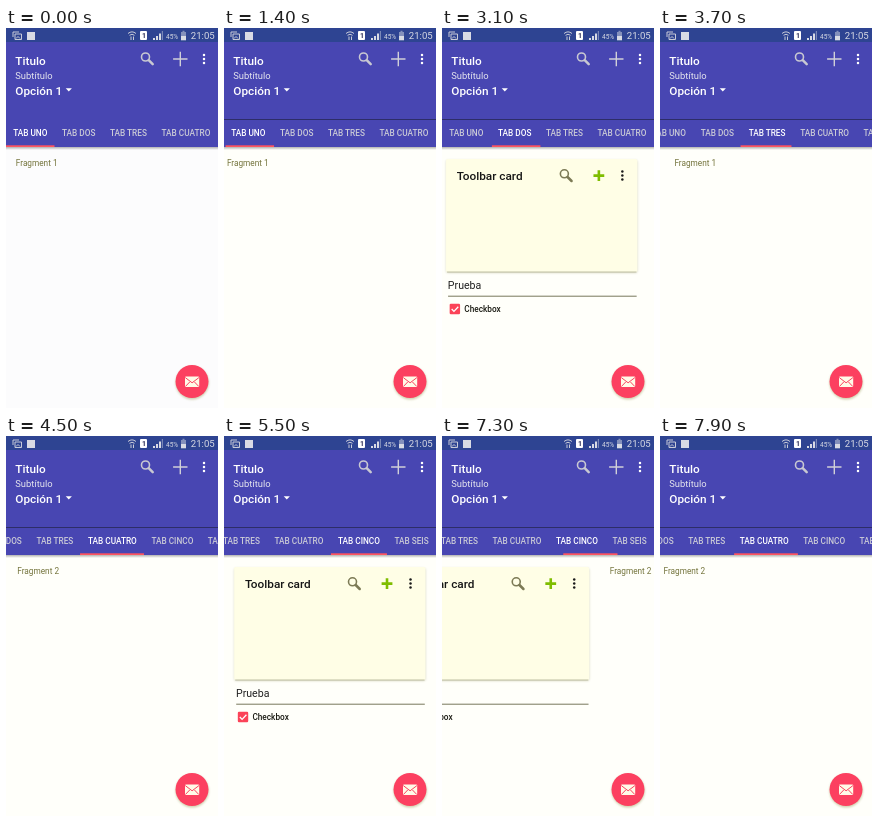
Animation of 212 by 380 pixels, one loop 8000 ms. Source, as an HTML page:

```html
<!DOCTYPE html>
<html lang="es">
<head>
<meta charset="utf-8">
<title>Tabs</title>
<style>
html, body { margin: 0; width: 100%; height: 100%; overflow: hidden; background: #fdfdfb; }
svg { display: block; width: 212px; height: 380px; }
text { font: 8.25px Roboto, sans-serif; white-space: pre; }
.head { font-size: 11.8px; font-weight: 500; }
.tab { font-weight: 500; }
.frag { fill: #74743c; }
</style>
</head>
<body>
<svg viewBox="0 0 212 380" xmlns="http://www.w3.org/2000/svg">
  <defs>
    <filter id="soft" x="-30%" y="-30%" width="160%" height="160%"><feGaussianBlur stdDeviation="1.2"/></filter>
    <linearGradient id="shade" x1="0" y1="0" x2="0" y2="1">
      <stop offset="0" stop-color="#555" stop-opacity=".45"/>
      <stop offset="1" stop-color="#555" stop-opacity="0"/>
    </linearGradient>
    <g id="lens" fill="none">
      <circle cx="5" cy="5" r="4" stroke-width="1.6"/>
      <path d="M8.2 8.2L12.2 12.2" stroke-width="2.5" stroke-linecap="round"/>
    </g>
    <g id="dots"><circle cy="-4" r="1.25"/><circle r="1.25"/><circle cy="4" r="1.25"/></g>
    <g id="card">
      <rect x="10" y="132" width="191.4" height="113" rx="2" fill="#8a8a50" opacity=".3" filter="url(#soft)"/>
      <rect x="10" y="131" width="191.2" height="113" rx="1.5" fill="#fffee6"/>
      <path d="M11 244H200.4" stroke="#a5a584" stroke-width=".7"/>
      <text class="head" x="20.7" y="152" fill="#161616">Toolbar card</text>
      <use href="#lens" x="123.3" y="140.8" stroke="#7c7a55"/>
      <path d="M162.8 142.2V153M157.4 147.6H168.2" stroke="#7fbd00" stroke-width="2.6"/>
      <use href="#dots" x="186.3" y="147.6" fill="#1a1a1a"/>
      <text x="11.8" y="261" style="font-size:10.6px" fill="#222">Prueba</text>
      <path d="M12 268.2H200.6" stroke="#77775c" stroke-width="1"/>
      <rect x="13.6" y="275.8" width="10.4" height="10.4" rx="1.2" fill="#fb4358"/>
      <path d="M15.6 281L17.9 283.4L22.2 278.8" fill="none" stroke="#fff" stroke-width="1.3"/>
      <text x="28.2" y="284.2" fill="#1c1c14" class="tab">Checkbox</text>
    </g>
  </defs>

  <rect id="bg" width="212" height="380"/>
  <g id="pages"></g>

  <rect y="119" width="212" height="3" fill="url(#shade)"/>
  <rect width="212" height="119" fill="#4846b2"/>
  <rect id="seam" y="91" width="212" height="1" fill="#25254f" opacity=".75"/>
  <rect width="212" height="14" fill="#2e4492"/>

  <g fill="none" stroke="#c8cbd8" stroke-width="1">
    <path d="M7 9V4H13M9 6H15.5V11.5H9ZM10 10.5L12 8.5L14 10.5"/>
    <path d="M122 5.5Q126 2.2 130 5.5M123.5 7.3Q126 5.2 128.5 7.3M125 12V8.5M127.5 8.5V12"/>
  </g>
  <g fill="#d8dbe4">
    <rect x="21" y="4" width="8" height="8"/>
    <rect x="134" y="3" width="7" height="9" rx="1" fill="#fff"/>
    <path d="M147 12H149V10H147ZM150 12H152V8H150ZM153 12H155V5.5H153Z"/>
    <path d="M155.8 12H157V3H155.8Z" opacity=".45"/>
    <path d="M175 4H176.5V2.8H178.5V4H180V8H175Z" opacity=".5"/>
    <rect x="175" y="8" width="5" height="4.3"/>
    <text x="160" y="10.5" style="font-size:6.5px">45%</text>
    <text x="184.8" y="11" style="font-size:9.6px">21:05</text>
  </g>
  <text x="136" y="10" style="font-size:7px;font-weight:700" fill="#282a54">1</text>

  <g fill="#fff">
    <text class="head" x="9.3" y="37.3">Titulo</text>
    <text x="9.3" y="51.2" style="font-size:9.4px" fill="#e6e6ee">Subtítulo</text>
    <text class="head" x="9.3" y="66.5">Opción 1</text>
    <path d="M59.7 60.3H65.9L62.8 63.5Z"/>
    <use href="#dots" x="198" y="31"/>
  </g>
  <use href="#lens" x="134.5" y="24" stroke="#c8c8d2"/>
  <path d="M174.3 23.8V38.2M167.1 31H181.5" stroke="#d0d0d8" stroke-width="1.4"/>

  <g id="strip"></g>

  <circle cx="186.2" cy="354.8" r="16.6" fill="#8b8b40" opacity=".42" filter="url(#soft)"/>
  <circle cx="186" cy="353.5" r="16.5" fill="#fc4060"/>
  <rect x="179" y="348.6" width="14.2" height="10.4" rx="1" fill="#fffbe8"/>
  <path d="M179.3 349.6L186.1 354.8L192.9 349.6M179.5 358.4L183.8 353.9M192.7 358.4L188.4 353.9" fill="none" stroke="#fc4060" stroke-width="1"/>
</svg>
<script>
const W = 212, LOOP = 8000, STEP = 100;
const $ = id => document.getElementById(id);

function add(parent, tag, attrs, text) {
  const el = document.createElementNS("http://www.w3.org/2000/svg", tag);
  for (const k in attrs) el.setAttribute(k, attrs[k]);
  if (text) el.textContent = text;
  return parent.appendChild(el);
}

// Pager position over time: [ms, page]
const keys = [
  [0, 0], [1300, 0], [1500, .11], [1800, .854], [1950, .975], [2200, 1],
  [3000, 1], [3100, 1.028], [3300, 1.3], [3500, 1.84], [3800, 2],
  [4000, 2], [4300, 2.62], [4500, 2.993], [4700, 3],
  [4800, 3], [5100, 3.5], [5300, 3.94], [5500, 3.999],
  [5700, 4.35], [5900, 4.86], [6200, 5],
  [6500, 5], [6800, 4.88], [7100, 4.6], [7300, 4.255], [7400, 4.05],
  [7500, 3.92], [7700, 3.34], [7900, 3.03], [8000, 3.02]
];
const slope = i => keys[i + 1] && keys[i]
  ? (keys[i + 1][1] - keys[i][1]) / (keys[i + 1][0] - keys[i][0]) : 0;

// Monotone tangent: never overshoots a key
function tangent(i) {
  const a = slope(i - 1), b = slope(i);
  return a * b > 0 ? 2 * a * b / (a + b) : 0;
}

function pageAt(t) {
  let i = 0;
  while (i < keys.length - 2 && keys[i + 1][0] <= t) i++;
  const [t0, p0] = keys[i], [t1, p1] = keys[i + 1];
  const h = t1 - t0, u = (t - t0) / h, v = 1 - u;
  return v * v * (1 + 2 * u) * p0 + u * u * (1 + 2 * v) * p1
    + h * u * v * (v * tangent(i) - u * tangent(i + 1));
}

const names = ["UNO", "DOS", "TRES", "CUATRO", "CINCO", "SEIS"];
const widths = [48.5, 48.5, 51, 64, 56, 49];
const lefts = widths.map((w, i) => widths.slice(0, i).reduce((a, b) => a + b, 0));
const maxScroll = lefts[5] + widths[5] - W;

const line = add($("strip"), "rect", { y: 117.3, height: 1.7, fill: "#ff5560" });
const tabs = names.map((n, i) => add($("strip"), "text",
  { class: "tab", x: lefts[i] + widths[i] / 2, y: 108, "text-anchor": "middle" }, "TAB " + n));

const pages = names.map((n, i) => {
  const g = add($("pages"), "g", {});
  if (i % 3 === 1) add(g, "use", { href: "#card" });
  else add(g, "text", { class: "frag", x: 9.8, y: 137.5 }, "Fragment " + (i % 2 + 1));
  return g;
});

function draw(t) {
  const pos = pageAt(t), i = Math.min(Math.floor(pos), 5), f = pos - i;
  const next = Math.min(i + 1, 5), now = Math.round(pos);
  const mix = list => list[i] + (list[next] - list[i]) * f;
  const left = mix(lefts), width = mix(widths);
  const center = lefts[i] + widths[i] / 2 + (widths[i] + widths[next]) * f / 2;
  const scroll = Math.max(0, Math.min(maxScroll, center - W / 2));

  pages.forEach((g, k) => {
    g.setAttribute("transform", `translate(${(k - pos) * W})`);
    g.setAttribute("display", Math.abs(k - pos) < 1 ? "inline" : "none");
  });
  $("strip").setAttribute("transform", `translate(${-scroll})`);
  line.setAttribute("x", left);
  line.setAttribute("width", width);
  tabs.forEach((el, k) => el.setAttribute("fill", k === now ? "#fff" : "#cacad6"));

  const moved = t >= 1400;
  $("bg").setAttribute("fill", moved ? "#fffffa" : "#fcfcfd");
  $("seam").setAttribute("display", moved ? "inline" : "none");
}

const start = performance.now();
function tick() {
  const t = (performance.now() - start) % LOOP;
  draw(Math.floor(t / STEP) * STEP);
  requestAnimationFrame(tick);
}
tick();
</script>
</body>
</html>
```
